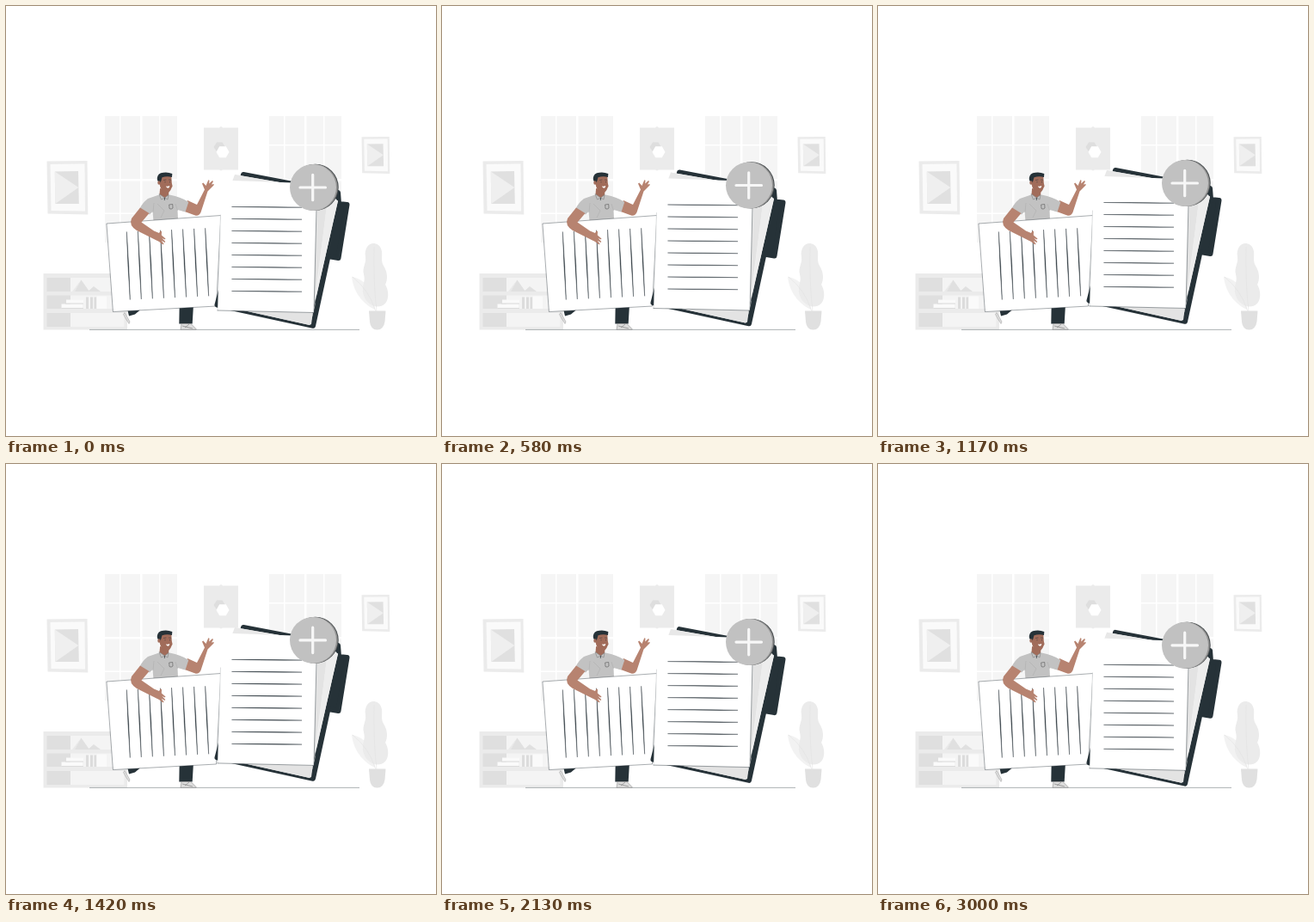
An HTML page for the animation above (3.04 s loop, 500 by 500 pixels).

```html
<!DOCTYPE html>
<html lang="en">
<head>
<meta charset="utf-8">
<style>
  html, body { margin: 0; width: 100%; height: 100%; overflow: hidden; background: #fff; }
  svg { display: block; width: 100vw; height: 100vh; }
  .ink { fill: #263238; }
  .skin { fill: #b78370; }
  .face { fill: #a16c5a; }
  .shirt { fill: #c2c2c2; }
  .line { fill: none; stroke: #263238; stroke-width: .45; stroke-linecap: round; stroke-linejoin: round; }
  .strokes { fill: #263238; stroke: #263238; stroke-width: .4; stroke-linejoin: round; }
</style>
</head>
<body>
<svg viewBox="0 0 500 500">
  <!-- room -->
  <g id="windows" fill="#f5f5f5"></g>
  <g id="frame">
    <path fill="#ebebeb" d="M47.500 180.500L94.500 180L95.300 242.500L48.500 241.500Z"/>
    <path fill="#fafafa" d="M51.500 184L91.500 183.500L92 238.500L52.500 238Z"/>
    <path fill="#e0e0e0" d="M56.800 192.500L84 192L84.800 230L57.300 230Z"/>
    <path fill="#efefef" d="M56.800 192.500L84.400 211L57.300 230Z"/>
  </g>
  <use href="#frame" transform="translate(413.500 152) scale(.686) translate(-47.500 -180)"/>
  <path fill="#ebebeb" d="M230 141.500H248L250 140L252 141.500H270V190.500H252L250 191.500L248 190.500H230Z"/>
  <path fill="#dedede" d="M245 158.500H251.500L255 164L251.500 169.500H245L241.500 164Z"/>
  <path fill="#fff" d="M248.200 163.300H255.800L259.500 169.700L255.800 176.200H248.200L244.500 169.700Z"/>

  <!-- shelf -->
  <path fill="#ebebeb" d="M43.500 311H141V376.500H43.500Z"/>
  <path fill="#dfdfdf" d="M47.500 316H75V332H47.500ZM47.500 336.500H75V352H47.500ZM47.500 357H75V373H47.500Z"/>
  <path fill="#f4f4f4" d="M75 316H137.500V332H75ZM75 336.500H137.500V352H75ZM75 357H137.500V373H75Z"/>
  <path fill="#e0e0e0" d="M78 332L87.500 318.500L97 332ZM95 332L102 326L110 332Z"/>
  <path fill="#e9e9e9" d="M87.500 318.500L80 332H77Z"/>
  <path fill="#fafafa" d="M70 341.500H90V346H70ZM64.500 346.500H89V351.500H64.500ZM106 337.500H117V352H106Z"/>
  <path fill="#dcdcdc" d="M69 345.500H90V346.500H69ZM64.500 351H90V352H64.500ZM93 338.500H96V352H93ZM98 338.500H101V352H98ZM102.500 338.500H105V352H102.500Z"/>

  <!-- plant -->
  <path fill="#f2f2f2" d="M402 314.500C412 317 423 324 428 338L429 353C416 347 404 334 402 314.500Z"/>
  <path fill="#ebebeb" d="M420 280C424 274 433 275 436 282C439 289 435 295 439 302C444 310 444 318 441 324C446 332 446 346 436 349C425 352 414 341 415 329C415 322 418 320 416 312C414 304 419 300 418 292C417 287 418 283 420 280Z"/>
  <path fill="none" stroke="#dedede" stroke-width=".5" d="M428 280Q427 320 431 355M403 315Q422 330 430 355"/>
  <path fill="#e0e0e0" d="M422 354.500H441.500L440.500 367Q439 376.500 431.500 376.500Q424 376.500 423 367Z"/>
  <path fill="none" stroke="#8b9194" stroke-width=".7" d="M97 376.400H411"/>

  <!-- legs -->
  <path class="ink" d="M201.700 347H218L216.700 369.500H201.300ZM141 352L160 350L150 358.500L143 360.500Z"/>
  <path fill="#ddd" stroke="#777" stroke-width=".5" d="M204 369.500H215L221 375.500V376.300H203Z"/>
  <path fill="none" stroke="#777" stroke-width=".6" d="M205 372L217 375M208 374L213 370"/>
  <path fill="#ddd" stroke="#888" stroke-width=".4" d="M138 356.500L144 367L143 369.500L139.500 364L136.500 358.500Z"/>

  <!-- torso and raised arm -->
  <path class="skin" d="M205 238L211 226L222 231L231 213.500L228 206.500L229.300 205.500L232.500 209L235.300 202.300L236.500 202.700L236.200 206.500L240 203L241 204L239 207.500L241.800 207L241.500 208.500L237.500 212.500L234.500 215.500L226.500 240Q224.500 244.500 220 243.500Z"/>
  <path class="shirt" d="M178 219.500L165 224Q158.500 229 155.500 235.500L167 242.500L170.500 239L172 256H200.300L199.500 237L208.500 239.500L212.300 228Q204 222 190 219.500Z"/>
  <path fill="none" stroke="#ababab" stroke-width=".5" d="M171 240L172 229M199.500 238L197 230M176 230L184 238L180 246"/>
  <path class="face" d="M179 212L189.500 215L189 220.500L185 223.500L178.500 219Z"/>
  <path class="shirt" stroke="#777" stroke-width=".5" d="M178 218.500L184.500 223L189 219.500L188 225L184.500 223L180.500 225Z"/>
  <path class="ink" d="M184 223H184.800L184.500 226H183.900Z"/>
  <path fill="none" stroke="#555" stroke-width=".6" d="M189.700 231L193.700 230.500L194 235Q192 237 190 235.500Z"/>

  <!-- head -->
  <path class="face" d="M178.500 198H192.300L192.800 206L193.600 209.500L192.300 212Q190.500 217.500 186 217Q180 215.500 178.700 208Z"/>
  <path class="ink" d="M176 202.500Q175 196.500 180 194.300Q187 192.300 193.300 195L193 199Q187 197.600 181.500 199.300L180 204.500L178.500 206.500Z"/>
  <ellipse class="face" cx="178" cy="205.500" rx="1.700" ry="2.200"/>
  <path class="line" d="M183.500 202.500L186 202M189.500 202L191.700 202.300M185 204.300V205M190.500 204.300V205"/>
  <path fill="#fff" d="M186 209.500Q188.300 210 190.300 209Q190 212 188.300 211.800Q186.500 211.500 186 209.500Z"/>

  <!-- carried sheet -->
  <path class="line" style="fill: #fff; stroke-width: .4" d="M117.300 253L250 243.500L244.500 349L124.800 355.500Z"/>
  <g id="columns" class="strokes"></g>

  <!-- holding arm -->
  <path class="skin" d="M156 234.500L166.500 241L157.500 251.500L172 261.500L178 264L179.500 261.500L181 262L180.800 266.500L185.500 270.500L184.800 271.500L181.500 270L185.300 274L184.500 275L180.500 272.500L183.500 276.500L182.500 277.500L178 274L172 271L152 261Q142.500 255 146 247Z"/>

  <!-- floating folder -->
  <g id="folder">
    <path class="ink" stroke="#263238" stroke-width="6" stroke-linejoin="round" d="M276 196L386 217L387 230L396.500 231L386.500 293L374.500 291L357 371.800L245.500 347.500L258 300Z"/>
    <path fill="#f2f2f2" d="M266 196L375 215L386 227L353 371L267 352Z"/>
    <path fill="#e3e3e3" d="M362 236L373 234L355 370L353 371L271 352.800L357 357Z"/>
    <path fill="#ededed" d="M373 230L386 226L353.500 371L359 350Z"/>
    <path fill="#e8e8e8" d="M266 196L330 207V209L263 204Z"/>
    <path fill="#fff" d="M250.500 202.500L361 206.500L358 356.500L246 354Z"/>
    <path class="line" d="M361 236L358 356.500L246 354"/>
    <path class="line" opacity=".35" d="M249.500 243L246 354"/>
    <g id="rows" class="strokes"></g>
    <circle cx="359.700" cy="210.800" r="27" fill="#454a4c"/>
    <circle cx="358.700" cy="211" r="27" fill="#929292"/>
    <circle cx="357" cy="211" r="27" fill="#c1c1c1"/>
    <path fill="none" stroke="#f7f7f7" stroke-width="3.200" stroke-linecap="round" d="M342 211H371.500M356.700 196.300V225.700"/>
  </g>
</svg>
<script>
const el = id => document.getElementById(id);
const path = d => `<path d="${d}"/>`;

// A stroke that swells in the middle and tapers at both ends.
function taper(x1, y1, x2, y2, width) {
  const mx = (x1 + x2) / 2, my = (y1 + y2) / 2, len = Math.hypot(x2 - x1, y2 - y1);
  const dx = (y1 - y2) / len * width, dy = (x2 - x1) / len * width;
  return path(`M${x1} ${y1}Q${mx + dx} ${my + dy} ${x2} ${y2}Q${mx - dx} ${my - dy} ${x1} ${y1}Z`);
}

let columns = '', rows = '', panes = '';
for (let i = 0; i < 8; i++) {
  const x = 140.3 + i * 13.05, top = 262.5 - i * 0.6;
  columns += taper(x, top, x + 4, top + 79, 0.8);
  const y = 233.8 + i * 14;
  rows += taper(262.5, y - 0.3, 344, y + 0.4, 0.7);
}
for (const left of [115, 306])
  for (const [x, w] of [[0, 17], [18.5, 22.5], [43.5, 19.5], [64.5, 19.5]])
    for (const [y, h] of [[128, 33], [162.5, 38.5], [203.5, 37], [242, 33]])
      panes += path(`M${left + x} ${y}h${w}v${h}h${-w}Z`);
el('columns').innerHTML = columns;
el('rows').innerHTML = rows;
el('windows').innerHTML = panes;

// Steady rise for half the loop, then the same way down.
const LOOP = 3040, LIFT = 6.5;
function draw() {
  const phase = performance.now() % LOOP / LOOP;
  const y = -LIFT * (1 - Math.abs(1 - 2 * phase));
  el('folder').setAttribute('transform', `translate(0 ${y.toFixed(3)})`);
  requestAnimationFrame(draw);
}
draw();
</script>
</body>
</html>
```
